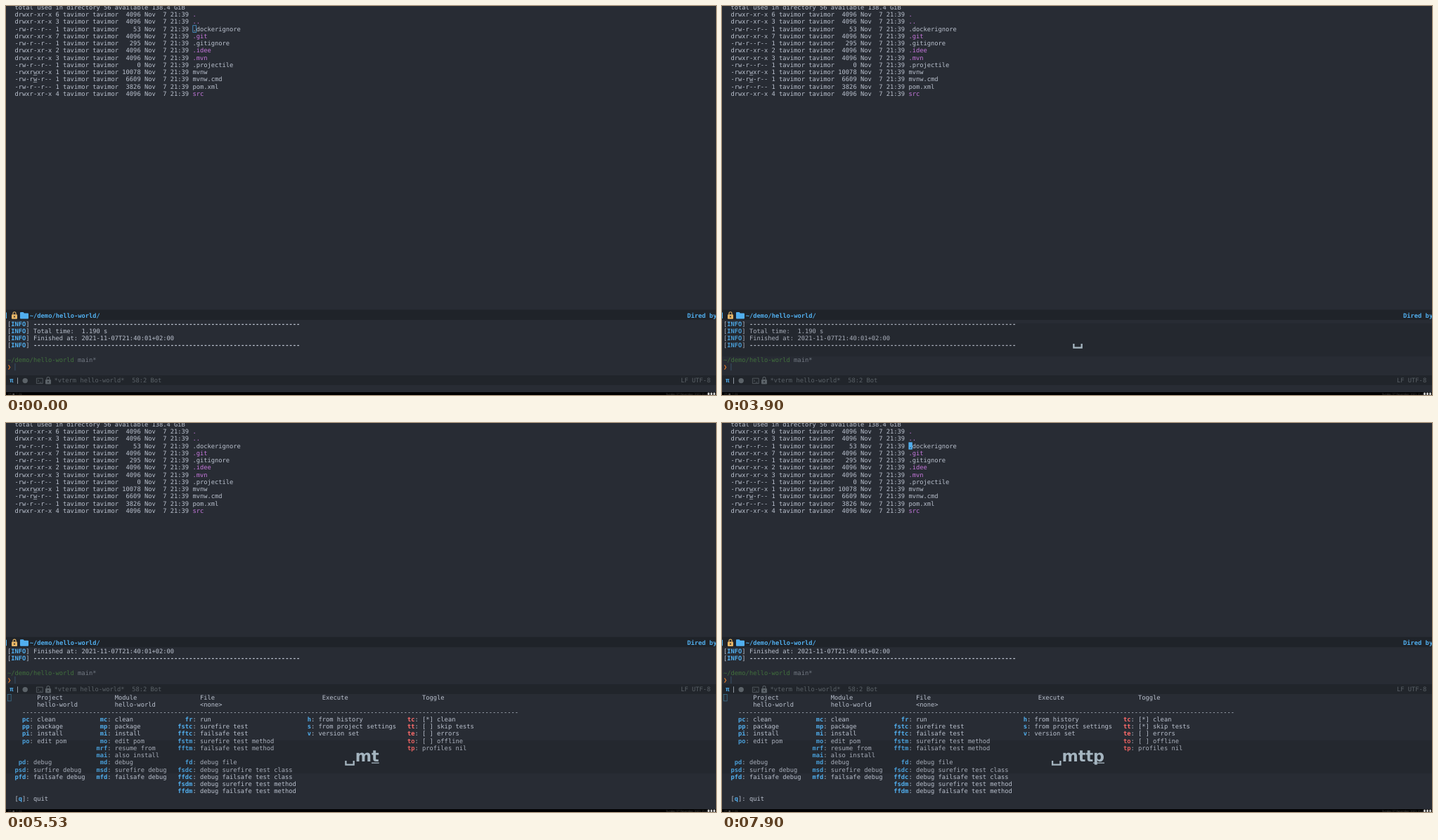
Recreate the animation shown at these times as an HTML page. Size 1010x554 px, loop 8 s.

```html
<!DOCTYPE html>
<html lang="en">
<head>
<meta charset="utf-8">
<title>Maven menu in a terminal</title>
<style>
  html, body { margin: 0; height: 100%; overflow: hidden; background: #282c34; }
  svg { display: block; width: 100vw; height: 100vh; }
  text { font: 8.75px "DejaVu Sans Mono", monospace; fill: #bbc2cf; white-space: pre; text-rendering: geometricPrecision; }
  .bold { font-weight: bold; }
  #keys text { font: bold 22.3px "DejaVu Sans", sans-serif; fill: #a5b5c0; }
  #tray text { font: 3.6px "DejaVu Sans", sans-serif; fill: #4a4a4a; }
</style>
</head>
<body>
<svg id="stage" viewBox="0 0 1010 554" xml:space="preserve"></svg>
<script>
const LOOP = 8000, CHAR = 5.268, LINE = 10.26;
const BLUE = '#51afef', MAGENTA = '#c678dd', RED = '#ff6c6b', GRAY = '#5b6268', FG = '#bbc2cf';
const USER = 'tavimor';

const col = c => 2 + c * CHAR;
const esc = s => s.replace(/</g, '&lt;');
const span = (s, fill, cls = '') => `<tspan fill="${fill}" style="fill:${fill}" class="${cls}">${s}</tspan>`;
const bold = (s, fill = BLUE) => span(s, fill, 'bold');
const text = (x, y, s, id = '') => `<text x="${x}" y="${y}" id="${id}">${s}</text>`;
const rect = (x, y, w, h, fill, extra = '') =>
  `<rect x="${x}" y="${y}" width="${w}" height="${h}" fill="${fill}" ${extra}/>`;
const group = (id, s) => `<g id="${id}">${s}</g>`;
const lock = (x, y, fill) => rect(x, y + 4, 8, 6.4, fill, 'rx="1"') +
  `<path d="M${x + 2} ${y + 4.5}v-2a2 2 0 0 1 4 0v2" fill="none" stroke="${fill}" stroke-width="1.1"/>` +
  `<circle cx="${x + 4}" cy="${y + 7.2}" r="1" fill="#21252b"/>`;

// Directory listing
const files = [
  ['drwxr-xr-x 6', 4096, '.'], ['drwxr-xr-x 3', 4096, '..'], ['-rw-r--r-- 1', 53, '.dockerignore'],
  ['drwxr-xr-x 7', 4096, '.git'], ['-rw-r--r-- 1', 295, '.gitignore'], ['drwxr-xr-x 2', 4096, '.idee'],
  ['drwxr-xr-x 3', 4096, '.mvn'], ['-rw-r--r-- 1', 0, '.projectile'], ['-rwxrwxr-x 1', 10078, 'mvnw'],
  ['-rw-rw-r-- 1', 6609, 'mvnw.cmd'], ['-rw-r--r-- 1', 3826, 'pom.xml'], ['drwxr-xr-x 4', 4096, 'src']
];
const listing = text(2, 4.8, '  total used in directory 56 available 138.4 GiB') +
  files.map(([mode, size, name], i) => {
    const y = 4.8 + LINE * (i + 1);
    const label = mode[0] === 'd' ? span(name, MAGENTA) : name;
    const mark = mode[5] === 'w' ? rect(col(7), y + 0.9, CHAR, 0.6, FG) : '';
    return text(2, y, `  ${mode} ${USER} ${USER} ${String(size).padStart(5)} Nov  7 21:39 ${label}`) + mark;
  }).join('');

const cursor = group('block', rect(265.4, 27.4, 5.4, 10.3, BLUE) + text(col(50), 35.6, span('.', '#1b2229'))) +
  group('hollow', rect(265.8, 27.8, 4.9, 9.6, 'none', `stroke="${BLUE}" stroke-width=".7"`));

const direBar = group('dired',
  rect(0, 432.5, 1010, 14.5, '#1f2329') + rect(0, 436.5, 1, 8.5, BLUE) + lock(8, 435.3, '#e5b567') +
  `<path d="M20 437q0-1 1-1h3.6l1.4 1.4h5q1 0 1 1v6q0 1-1 1h-10q-1 0-1-1z" fill="${BLUE}"/>` +
  text(33.8, 443.7, bold('~/demo/hello-world/')) + text(969, 443.7, bold('Dired by')));

// Shell output and prompt
const info = s => `[${bold('INFO')}] ${s}`;
const rule = info(bold('-'.repeat(72), FG));
const shellY = i => 455.6 + LINE * i;
const shell = group('shell',
  group('early', text(2, shellY(0), rule) + text(2, shellY(1), info('Total time:  1.190 s'))) +
  text(2, shellY(2), info('Finished at: 2021-11-07T21:40:01+02:00')) + text(2, shellY(3), rule) +
  text(2, shellY(5), span('~/demo/hello-world', '#41703d') + span(' main*', '#737a84')) +
  text(2, shellY(6), span('❯', '#e57c2a')) + rect(12.6, 509, 0.7, 10.2, '#41627e'));

const shellBar = group('vterm',
  rect(0, 526, 1010, 14, '#21252b') + text(5.2, 536.2, bold('π')) + text(13.8, 536.2, '|') +
  `<circle cx="27.2" cy="533.6" r="3.7" fill="${GRAY}"/>` +
  `<path d="M43.4 530.2h8.8v7.4h-8.8zM45 532.2l1.7 1.6-1.7 1.6M47.8 536h2.6" fill="none" stroke="${GRAY}" stroke-width=".8"/>` +
  lock(56, 528, GRAY) + text(68.5, 536.2, span('*vterm hello-world*  58:2 Bot', GRAY)) +
  text(960, 536.2, span('LF UTF-8', GRAY)));

// Command menu: each cell's text starts at its column, its key hangs to the left
const columns = [8, 29, 52, 84, 112];
const rows = `Project|Module|File| Execute|Toggle
hello-world|hello-world|<none>

pc: clean|mc: clean|fr: run|h: from history|tc: [*] clean
pp: package|mp: package|fstc: surefire test|s: from project settings|tt: [ ] skip tests
pi: install|mi: install|fftc: failsafe test|v: version set|te: [ ] errors
po: edit pom|mo: edit pom|fstm: surefire test method||to: [ ] offline
|mrf: resume from|fftm: failsafe test method||tp: profiles nil
|mai: also install
pd: debug|md: debug|fd: debug file
psd: surfire debug|msd: surefire debug|fsdc: debug surefire test class
pfd: failsafe debug|mfd: failsafe debug|ffdc: debug failsafe test class
||fsdm: debug surefire test method
||ffdm: debug failsafe test method`.split('\n');
const menuY = i => 394 + 10.267 * i;
const cell = (s, c, r) => {
  const [key, label] = s.split(': ');
  if (!label) return text(col(columns[c]), menuY(r), esc(s));
  const nudge = c === 0 && r > 8 ? 1 : 0;
  return text(col(columns[c] - key.length - 2 - nudge), menuY(r), bold(key, c === 4 ? RED : BLUE) + ':') +
    text(col(columns[c] - nudge), menuY(r), label, key === 'tt' ? 'skip' : '');
};
const menu = group('menu',
  rect(0, 386, 1010, 164, '#282c34') +
  rect(2.4, 386.5, 4.8, 9.4, 'none', 'stroke="#3f7a97" stroke-width=".7"') +
  rows.map((r, i) => r.split('|').map((s, c) => s && cell(s, c, i)).join('')).join('') +
  text(col(4), menuY(2), '-'.repeat(134)) +
  text(col(2), menuY(14), `[${bold('q')}]: quit`) +
  text(2, menuY(15), `Loading /home/${USER}/demo/hello-world/.idee/maven.el (source)...done`, 'echo'));

const keys = group('keys', rect(0, 452, 1010, 47.3, '#000', 'opacity=".1"') +
  '<path id="space" d="M2.1 481v5.6h11.3v-5.6" fill="none" stroke="#a5b5c0" stroke-width="2.3"/>' +
  text(0, 482.3, '', 'typed') + rect(0, 483.5, 0, 1.3, '#a5b5c0', 'id="underline"'));

const tray = group('tray', rect(0, 550, 1010, 4, '#000') +
  text(3, 553.8, '(P) ■ □ 01') + text(939, 553.6, 'Sunday 07 November 2021 21:40') +
  [998, 1002, 1006].map(x => rect(x, 550.6, 3, 3.4, '#c8c8c8', 'rx="1"')).join(''));

document.getElementById('stage').innerHTML =
  rect(0, 0, 1010, 554, '#282c34') + listing + cursor + shell + direBar + shellBar + menu + keys + tray;

const $ = id => document.getElementById(id);
const show = (id, on) => { $(id).style.display = on ? '' : 'none'; };
const move = (id, x, y) => $(id).setAttribute('transform', `translate(${x} ${y})`);

const blinks = [330, 600, 1070, 1570, 2370, 2670, 3130, 3730, 4070, 4570, 5030, 5530, 5970, 6500, 7030, 7400, 7900];
// [pressed at, underlined until, letters after the space]
const presses = [[3730, 3900, ''], [4070, 4230, 'm'], [5530, 5730, 'mt'], [5970, 6130, 'mtt'], [7900, 8100, 'mttp']];
const SPACE = 15.5, KEY_SIZE = 22.3;
const advance = { m: 1.042, t: 0.478, p: 0.716 };
const width = s => [...s].reduce((w, ch) => w + advance[ch] * KEY_SIZE, 0);

function drawKeys(t) {
  const press = presses.filter(p => p[0] <= t).pop();
  show('keys', press);
  if (!press) return;
  const [, until, letters] = press;
  const total = SPACE + width(letters), left = 506 - total / 2;
  const last = letters ? width(letters.slice(-1)) : SPACE;
  move('space', left, 0);
  $('typed').setAttribute('x', left + SPACE);
  $('typed').textContent = letters;
  $('underline').setAttribute('x', left + total - last);
  $('underline').setAttribute('width', last);
  show('underline', t < until);
}

function draw(t) {
  const open = t >= 4070;
  show('hollow', t < 330);
  show('block', blinks.filter(b => b <= t).length % 2);
  show('menu', open);
  show('early', !open);
  move('dired', 0, open ? -127.7 : 0);
  move('shell', 0, open ? -148.1 : 0);
  move('vterm', 0, open ? -154 : 0);
  show('echo', t < 5530 || (t >= 5970 && t < 7900));
  $('skip').textContent = `[${t >= 5970 ? '*' : ' '}] skip tests`;
  drawKeys(t);
}

const start = performance.now();
function tick() {
  draw((performance.now() - start) % LOOP);
  requestAnimationFrame(tick);
}
tick();
</script>
</body>
</html>
```
